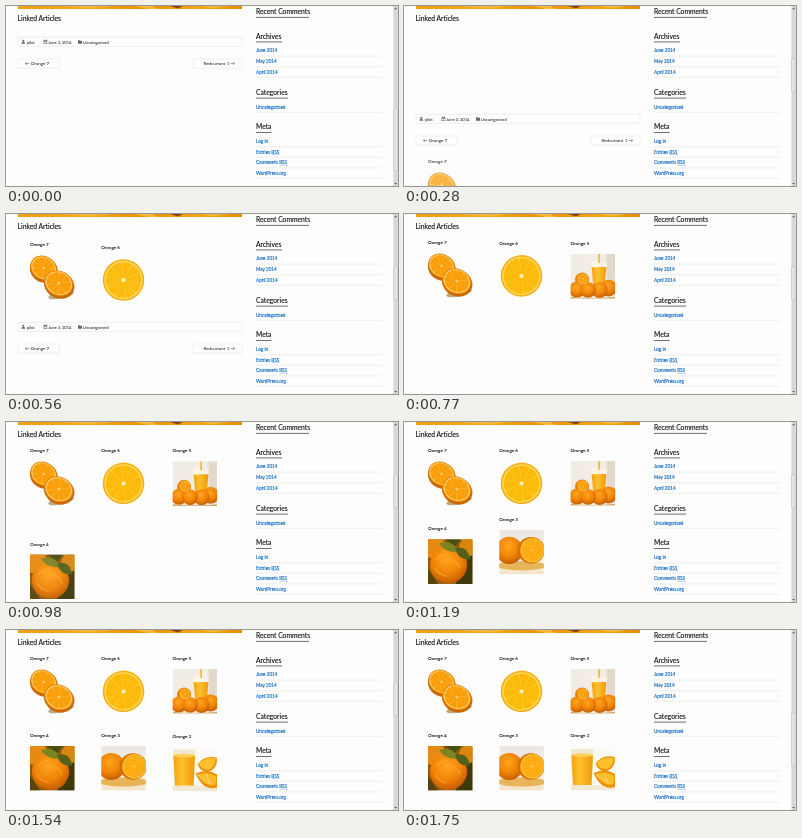
These frames come from a looping animation (392x180 px, 2.1 s). An HTML page:

```html
<!DOCTYPE html>
<html lang="en">
<head>
<meta charset="utf-8">
<title>Linked Articles</title>
<style>
  html, body { margin: 0; width: 100%; height: 100%; overflow: hidden; background: #fdfdfd; }
  svg { display: block; width: 100vw; height: 100vh; }
  text {
    font-family: Lato, sans-serif; font-size: 4.65px; color: #333;
    fill: currentColor; stroke: currentColor; stroke-width: .12px;
  }
  .head { font-size: 6.75px; color: #111; }
  .link { color: #0064c4; }
  .meta text { font-size: 4.1px; color: #555; }
  .nav text { font-size: 4.55px; color: #555; }
  .item text { font-size: 4.6px; color: #222; }
  .rule { stroke: #ebebeb; stroke-width: .8; fill: none; }
  .bar { stroke: #333; stroke-width: .7; }

  /* Paused animations, scrubbed through --t */
  .item { animation: rise 500ms ease calc(var(--s) - var(--t)) both paused; }
  .foot { animation: push 2100ms step-end calc(0ms - var(--t)) both paused; }
  .thumb { animation: thumb 2100ms step-end calc(0ms - var(--t)) both paused; }

  @keyframes rise {
    0% { opacity: 0; transform: translateY(574px); }
    60% { opacity: 1; transform: translateY(-8.6px); }
    80% { opacity: 1; transform: translateY(2.9px); }
    100% { opacity: 1; transform: translateY(0); }
  }
  @keyframes push {
    0% { transform: translateY(0); }
    6.6% { transform: translateY(77px); }
    36.6%, 100% { transform: translateY(154px); }
  }
  @keyframes thumb {
    0% { y: 103px; height: 62px; }
    6.6% { y: 53px; height: 33px; }
    83.2%, 100% { y: 83px; height: 53px; }
  }

  .rind { fill: var(--rind, #ea8604); }
  .pith { fill: var(--pith, #ffd275); }
  .flesh { fill: none; stroke: var(--flesh, #f99d08); }
</style>
</head>
<body>
<svg viewBox="0 0 392 180" style="--t:0ms">
  <defs>
    <linearGradient id="strip">
      <stop offset="0" stop-color="#f59c10"/><stop offset=".3" stop-color="#f9a81c"/>
      <stop offset=".55" stop-color="#ee9008"/><stop offset=".8" stop-color="#f8a316"/>
      <stop offset="1" stop-color="#e98c0a"/>
    </linearGradient>
    <radialGradient id="peel" cx=".45" cy=".35" r=".7">
      <stop offset="0" stop-color="#ffa51e"/><stop offset=".55" stop-color="#f08306"/>
      <stop offset="1" stop-color="#bd5600"/>
    </radialGradient>
    <linearGradient id="juice">
      <stop offset="0" stop-color="#f3a212"/><stop offset=".4" stop-color="#ffc02e"/>
      <stop offset="1" stop-color="#f09a08"/>
    </linearGradient>
    <linearGradient id="table" x2="0" y2="1">
      <stop offset="0" stop-color="#e9e6e2"/><stop offset=".6" stop-color="#f7f3ec"/>
      <stop offset="1" stop-color="#f4e4c6"/>
    </linearGradient>
    <clipPath id="frame"><rect width="44.6" height="44.6"/></clipPath>
    <g id="slice">
      <circle class="rind" r="21"/>
      <circle class="pith" r="19.4"/>
      <circle class="flesh" r="9.4" stroke-width="17" pathLength="100" stroke-dasharray="9.4 .6"/>
      <circle class="pith" r="2.2"/>
    </g>
  </defs>

  <rect width="392" height="180" fill="#fdfdfd"/>
  <rect x="12" width="224" height="3" fill="url(#strip)"/>
  <path d="M60 0q20 4 44 0zM128 0l14 3h10L146 0zM196 0q10 4 26 0z" fill="#fdb83c"/>
  <path d="M164 0l8 2.6 5-2.6z" fill="#8a4208"/>
  <text class="head" x="11.6" y="14.9">Linked Articles</text>

  <g class="foot">
    <g class="meta">
      <path class="rule" d="M12 31.3H236V40.4H12z"/>
      <g fill="#666">
        <circle cx="17.3" cy="34.8" r="1"/><path d="M15.4 37.8q0-2 1.9-2t1.9 2z"/>
        <path d="M37.6 34.3h3.6v3.6h-3.6zM38.2 33.6h.6v1h-.6zM40 33.6h.6v1h-.6z"/>
        <path d="M72 34.2h1.6l.5.6h1.9v3h-4z"/>
      </g>
      <path d="M38 35.5h2.8v2h-2.8z" fill="#ddd"/>
      <text x="20.8" y="37.5">pilot</text>
      <text x="42.2" y="37.5">June 3, 2014</text>
      <text x="76.8" y="37.5">Uncategorized</text>
    </g>
    <g class="nav">
      <path class="rule" d="M12 53H53.5V62.2H12zM187 53H236V62.2H187z"/>
      <text x="19" y="59.1">← Orange 7</text>
      <text x="229" y="59.1" text-anchor="end">Redcurrant 1 →</text>
    </g>
  </g>

  <g id="side"></g>

  <g transform="translate(24 39)"><g class="item" style="--s:140ms">
    <text y="-9">Orange 7</text>
    <ellipse cx="31" cy="40" rx="13" ry="3.4" transform="rotate(-12 31 40)" fill="#b9a883"/>
    <ellipse cx="13.8" cy="14.6" rx="14.4" ry="12.8" transform="rotate(35 13.8 14.6)" fill="#c96a03"/>
    <use href="#slice" transform="translate(13.6 12.8) rotate(32) scale(.66 .55)"/>
    <ellipse cx="29.2" cy="30" rx="15.6" ry="13.2" transform="rotate(25 29.2 30)" fill="#c96a03"/>
    <use href="#slice" transform="translate(28.8 28.2) rotate(25) scale(.7 .59)"/>
  </g></g>

  <g transform="translate(95.3 39)"><g class="item" style="--s:318ms">
    <text y="-9">Orange 6</text>
    <use href="#slice" transform="translate(22.2 22.4) rotate(12) scale(.99)"
      style="--rind:#f3b01a;--pith:#ffd654;--flesh:#fcba0a"/>
    <circle cx="22.2" cy="22.4" r="2" fill="#fff0c0"/>
  </g></g>

  <g transform="translate(166.6 39)"><g class="item" style="--s:520ms">
    <text y="-9">Orange 5</text>
    <g clip-path="url(#frame)">
      <rect width="44.6" height="44.6" fill="#f1ece4"/>
      <path d="M36 0h8.6v36H36z" fill="#e2d9cb"/>
      <path d="M28.5 14V0" stroke="#f5b41c" stroke-width="1.5"/>
      <path d="M20.5 9h15.6l-2 25h-11z" fill="#faf5e8"/>
      <path d="M21 13h14.8l-1.8 21H22.8z" fill="url(#juice)"/>
      <circle cx="24" cy="10" r="3.6" fill="#fff6df"/>
      <g fill="url(#peel)">
        <circle cx="11.5" cy="25.5" r="7"/><circle cx="38" cy="34" r="8.4"/>
        <circle cx="6.5" cy="35.5" r="8"/><circle cx="29" cy="36" r="8"/>
        <circle cx="17.5" cy="36" r="7.8"/>
      </g>
      <use href="#slice" transform="translate(12.5 25) scale(.27)"/>
      <path d="M0 42.8q22 2.4 44.6 0v2H0z" fill="#d3a766"/>
    </g>
  </g></g>

  <g transform="translate(24 116)"><g class="item" style="--s:758ms">
    <text y="-9">Orange 4</text>
    <g clip-path="url(#frame)">
      <rect width="44.6" height="44.6" fill="#8a5a10"/>
      <circle cx="5" cy="7" r="12" fill="#e58a12"/>
      <circle cx="40" cy="8" r="9" fill="#d9860f"/>
      <path d="M17 0h16l-6 7z" fill="#4a4d10"/>
      <path d="M33 22l11.6-6v28.6H28z" fill="#3f3a0c"/>
      <path d="M0 30l10 14.6H0z" fill="#5a420c"/>
      <circle cx="20.5" cy="25.5" r="18.6" fill="url(#peel)"/>
      <path d="M11 4q13-4 20 8-13 3-20-8z" fill="#7c8420"/>
      <path d="M27 9q13-4 15 11-12 1-15-11z" fill="#55611a"/>
      <path d="M8 20q6-6 12-6M7 29q5 7 12 8M24 20q6 3 8 9" fill="none" stroke="#ffb83c" stroke-width="1.2" opacity=".6"/>
    </g>
  </g></g>

  <g transform="translate(95.3 116)"><g class="item" style="--s:885ms">
    <text y="-9">Orange 3</text>
    <g clip-path="url(#frame)">
      <rect width="44.6" height="44.6" fill="url(#table)"/>
      <ellipse cx="22" cy="36" rx="25" ry="4.6" fill="#e8b45a"/>
      <circle cx="10" cy="20.5" r="13.6" fill="url(#peel)"/>
      <circle cx="31.4" cy="20.5" r="13.2" fill="#cf7204"/>
      <use href="#slice" transform="translate(33 20.4) scale(.6 .62)"
        style="--pith:#ffc748;--flesh:#fcab10"/>
    </g>
  </g></g>

  <g transform="translate(166.6 116)"><g class="item" style="--s:1090ms">
    <text y="-9">Orange 2</text>
    <g clip-path="url(#frame)">
      <rect width="44.6" height="44.6" fill="#fcfaf5"/>
      <path d="M0 39h44.6v5.6H0z" fill="#f1e8d6"/>
      <path d="M.4 3h22.4l-1.6 38H2z" fill="#f1e8d2"/>
      <path d="M.8 9h21.6l-1.5 30H2.4z" fill="url(#juice)"/>
      <ellipse cx="11.6" cy="9" rx="10.8" ry="1.8" fill="#ffd15c"/>
      <path d="M25 18Q31 8 44 11q2 9-7 14-8 2-12-7z" fill="#ee9208"/>
      <path d="M26 17.5Q32 10 43 12q0 7-6 11-7 1-11-5.5z" fill="#ffc02e"/>
      <path d="M23 27q12-5 21.6 1v13q-14 4-21.6-14z" fill="#ec8e06"/>
      <path d="M24.5 28q11-4 19 2 1 6-2 9-11 0-17-11z" fill="#ffbb26"/>
      <path d="M25 28l15 10M34 27l3 10" stroke="#ffe09a" stroke-width=".6"/>
    </g>
  </g></g>

  <rect x="387.4" width="4.6" height="180" fill="#d8d8d8"/>
  <path d="M388.3 3.2l1.3-1.6 1.3 1.6zM388.3 177l1.3 1.6 1.3-1.6z" fill="#444"/>
  <rect class="thumb" x="387.6" width="4.2" rx=".5" fill="#e4e4e4" stroke="#b4b4b4" stroke-width=".5"/>
</svg>
<script>
  const svg = document.querySelector('svg');
  const side = document.getElementById('side');

  // Heading, its baseline, underline width, then the list below it
  const widgets = [
    ['Recent Comments', 8.1, 53, []],
    ['Archives', 32.6, 26, ['June 2014', 'May 2014', 'April 2014']],
    ['Categories', 88.8, 32, ['Uncategorized']],
    ['Meta', 123.2, 15.5, ['Log in', 'Entries RSS', 'Comments RSS', 'WordPress.org']]
  ];

  side.innerHTML = widgets.map(([title, y, w, list]) => {
    const rows = list.map((label, i) => {
      const base = y + 13.7 + i * 10.6;
      const dots = label.endsWith('RSS')
        ? `<path d="M${label[0] === 'E' ? 266 : 274} ${base + 1.2}h8" stroke="#0064c4" stroke-width=".5" stroke-dasharray=".6 .6"/>`
        : '';
      return `<text class="link" x="250" y="${base}">${label}</text>${dots}
        <path class="rule" d="M250 ${base + 3.8}H376"/>`;
    });
    return `<text class="head" x="250" y="${y}">${title}</text>
      <path class="bar" d="M250 ${y + 3.3}h${w}"/>${rows.join('')}`;
  }).join('');

  const LOOP = 2100, STEP = 70;

  function draw(now) {
    let t = Math.floor((now % LOOP) / STEP) * STEP;
    if (t > 1540 && t < 1750) t = 1540;
    svg.style.setProperty('--t', t + 'ms');
  }

  const start = performance.now();
  function tick() {
    draw(performance.now() - start);
    requestAnimationFrame(tick);
  }
  tick();
</script>
</body>
</html>
```
